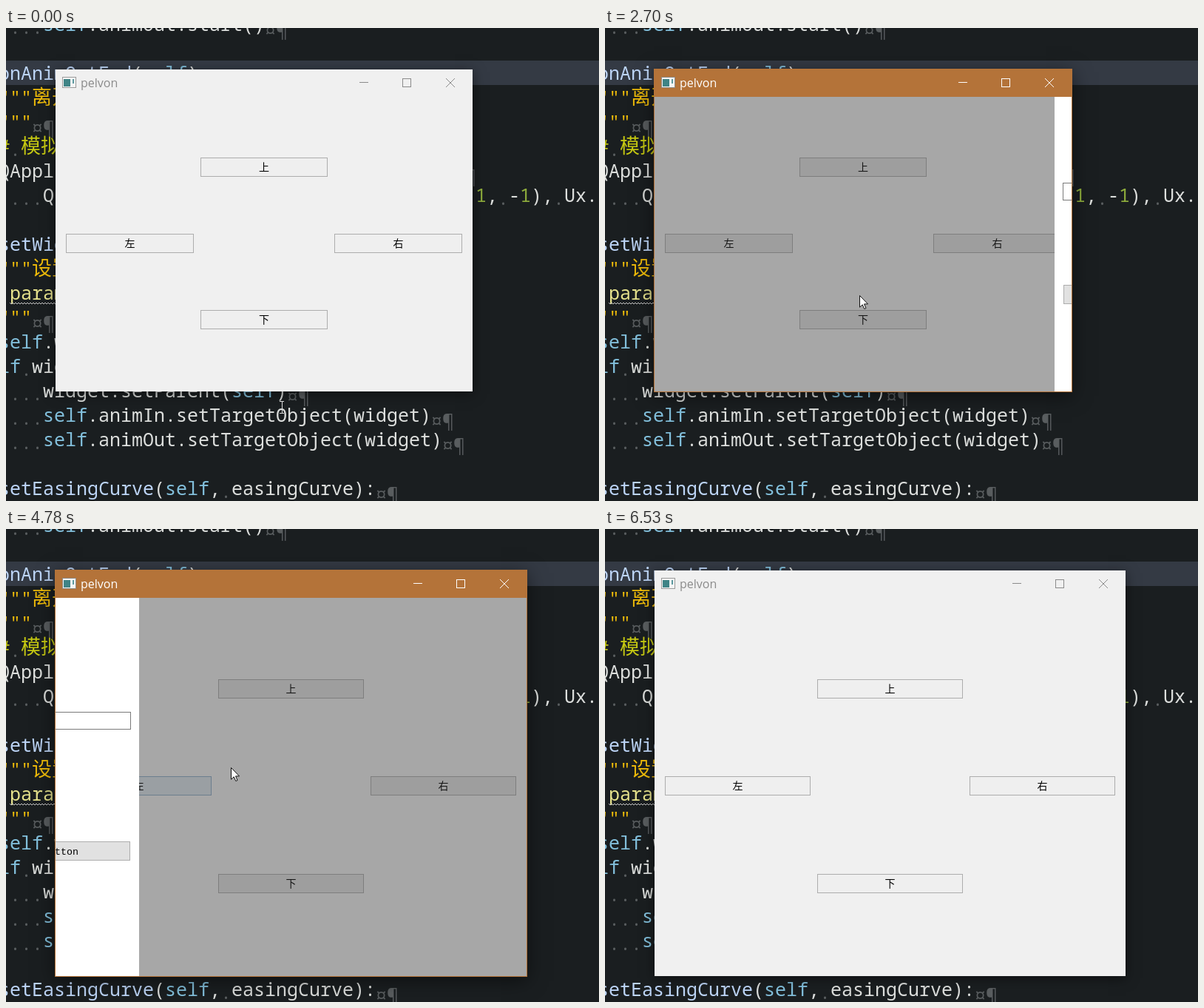
Write an HTML page with a canvas that moves like this. It is 802 px wide and 639 px high and loops after 6.56 s.

```html
<!DOCTYPE html>
<html lang="zh">
<head>
<meta charset="utf-8">
<style>
html, body { margin: 0; width: 100%; height: 100%; overflow: hidden; background: #1a1e20; }
canvas { display: block; }
</style>
</head>
<body>
<canvas id="stage" width="802" height="639"></canvas>
<script>
const g = document.getElementById('stage').getContext('2d');
const LOOP = 6560, SLIDE = 250, LEFT = 67, TOP = 93;
const GRAB = 4060, DROP = 4450, FOCUS = 250, BLUR = 6440;
const CELL = 15, ROW = 33;
const MONO = '25px "Noto Sans Mono", "Noto Sans CJK SC", monospace';
const HAN = '27px "Noto Sans CJK SC", "Noto Sans CJK", sans-serif';
const LABEL = '300 14px "Noto Sans CJK SC", "Noto Sans CJK", sans-serif';

const CODE = [
  '    self.animOut.start()¤¶',
  '',
  'onAnimOutEnd(self):',
  '"""离开',
  '"""¤¶',
  '# 模拟',
  'QAppl'.padEnd(41) + '¤¶',
  '    Q'.padEnd(43) + '1, -1), Ux.',
  '',
  'setWidget(',
  '"""设置',
  ':param',
  '"""¤¶',
  'self.widget',
  'if widget',
  '    widget.setParent(self)¤¶',
  '    self.animIn.setTargetObject(widget)¤¶',
  '    self.animOut.setTargetObject(widget)¤¶',
  '',
  'setEasingCurve(self, easingCurve):¤¶'
];

const INKS = [
  [/^[a-z]\w+(?=\()/, '#bcd4f6'],
  [/^"""[^¤]*/, '#eebb0a'],
  [/^#.*/, '#c6c912'],
  [/^(self|if)\b/, '#82bfdb'],
  [/^param/, '#e6e28c'],
  [/^\d/, '#8fae3c'],
  [/^[¤¶ ]/, '#595d5f'],
  [/^(\w+|.)/, '#dcdedc']
];

// when each drawer is opened and closed, and where the closing click lands
const VISITS = [
  { side: 'left', open: 300, close: 620, away: [400, 300] },
  { side: 'top', open: 890, close: 1582, away: [345, 293] },
  { side: 'right', open: 2030, close: 2575, away: [343, 360] },
  { side: 'bottom', open: 2840, close: 3178, away: [473, 353] },
  { side: 'left', open: 4725, close: 5180, away: [391, 301] },
  { side: 'top', open: 5740, close: 6130, away: [420, 588] }
];

const BUTTONS = {
  top: ['上', 1, -1], left: ['左', 0, 0], right: ['右', 2, 0], bottom: ['下', 1, 1]
};

const clamp = v => Math.max(0, Math.min(1, v));
const mix = (a, b, k) => a + (b - a) * k;
const easeOut = k => 1 - (1 - k) ** 3;
const smooth = k => k * k * (3 - 2 * k);
const blend = (a, b, k) => `rgb(${a.map((v, i) => Math.round(mix(v, b[i], k)))})`;

function rect(x, y, w, h, fill) {
  g.fillStyle = fill;
  g.fillRect(x, y, w, h);
}

function box(x, y, w, h, fill, line) {
  rect(x, y, w, h, line);
  rect(x + 1, y + 1, w - 2, h - 2, fill);
}

function text(str, x, y, font, fill, align = 'left') {
  g.font = font;
  g.fillStyle = fill;
  g.textAlign = align;
  g.fillText(str, x, y);
}

function lines(color, width, ...paths) {
  g.strokeStyle = color;
  g.lineWidth = width;
  g.beginPath();
  for (const p of paths)
    p.forEach(([x, y], i) => i ? g.lineTo(x, y) : g.moveTo(x, y));
  g.stroke();
}

function drawLine(line, y) {
  let x = -10, rest = line;
  while (rest) {
    const [pattern, ink] = INKS.find(([p]) => p.test(rest) && (p !== INKS[0][0] || rest === line));
    const token = rest.match(pattern)[0];
    for (const ch of token) {
      const wide = ch > '\u3000';
      if (ch === ' ') text('.', x, y + 4, MONO, '#595d5f');
      else text(ch, x, y + ('¤¶'.includes(ch) ? 8 : 0), wide ? HAN : MONO, ink);
      x += wide ? 27 : CELL;
    }
    rest = rest.slice(token.length);
  }
}

function drawCode() {
  rect(0, 0, 802, 639, '#1a1e20');
  rect(0, 44, 802, ROW, '#343a44');
  CODE.forEach((line, i) => drawLine(line, 4 + i * ROW));
  const wave = [];
  for (let x = 5; x < 70; x += 2) wave.push([x, 371 + (x >> 1) % 2 * 2]);
  lines('#c8c8c8', 1, wave);
}

function sizeAt(t) {
  const k = smooth(clamp((t - GRAB) / (DROP - GRAB)));
  return [Math.round(mix(564, 637, k)), Math.round(mix(398, 511, k))];
}

function buttonBox(side, w, h) {
  const [, col, row] = BUTTONS[side];
  const bw = (w - 46) / 3, x0 = LEFT + 14 + col * (bw + 9);
  const x = Math.round(x0);
  const y = Math.floor(TOP + h / 2 - 13.6 + row * (h / 4 + 3.4));
  return [x, y, Math.round(x0 + bw) - x, 26];
}

function drawFrame(w, h, active) {
  const right = LEFT + w;
  g.save();
  g.shadowColor = 'rgba(0,0,0,.5)';
  g.shadowBlur = active ? 24 : 16;
  g.shadowOffsetY = active ? 5 : 3;
  if (active) rect(66, 55, w + 2, h + 39, '#b47339');
  else rect(67, 56, w, h + 37, '#f0f0f0');
  g.restore();
  rect(LEFT, TOP, w, h, '#f0f0f0');

  const fg = active ? '#fff' : '#8b8b8b';
  box(76, 66, 19, 15, '#f4f4f4', active ? '#8f8a84' : '#9a9a9a');
  rect(78, 69, 9, 10, '#3f8486');
  rect(90, 69, 2, 6, '#5d9aa0');
  text('pelvon', 101, 80, '16px "Open Sans", "Noto Sans", sans-serif', fg);
  rect(right - 153, 73, 12, 1, fg);
  g.strokeStyle = fg;
  g.lineWidth = 1;
  g.strokeRect(right - 94.5, 68.5, 11, 11);
  const cx = right - 30;
  lines(fg, 1, [[cx - 6, 68], [cx + 6, 80]], [[cx + 6, 68], [cx - 6, 80]]);
}

function drawButtons(t, w, h, active) {
  const lit = VISITS.find(v => t > v.open - 60 && t < v.open + 200);
  for (const side in BUTTONS) {
    const [x, y, bw, bh] = buttonBox(side, w, h);
    const k = lit && lit.side === side ? clamp((t - lit.open + 60) / 100) : 0;
    const fill = active ? blend([225, 225, 225], [218, 226, 233], k) : '#efefef';
    box(x, y, bw, bh, fill, blend([173, 173, 173], [142, 173, 198], k * k));
    text(BUTTONS[side][0], x + bw / 2, y + 18, LABEL, '#000', 'center');
  }
}

function drawDrawer(side, shown, w, h) {
  const flat = side === 'top' || side === 'bottom';
  const pw = flat ? w : Math.round(w / 3), ph = flat ? Math.round(h / 2) : h;
  const reveal = Math.ceil((flat ? ph : pw) * shown);
  const x = LEFT + (side === 'left' ? reveal - pw : side === 'right' ? w - reveal : 0);
  const y = TOP + (side === 'top' ? reveal - ph : side === 'bottom' ? h - reveal : 0);
  const gap = (ph - 50) / 3, by = y + Math.round(ph - 28 - gap);
  rect(LEFT, TOP, w, h, 'rgba(55,55,55,.392)');
  rect(x, y, pw, ph, '#fff');
  box(x + 11, y + Math.round(gap), pw - 22, 24, '#fff', '#7a7a7a');
  box(x + 12, by, pw - 24, 26, '#e1e1e1', '#adadad');
  text('button', x + pw / 2, by + 18, '13.3px "Liberation Mono", monospace', '#000', 'center');
}

// the pointer rests on each button, then at each closing spot
function buildPath() {
  const stops = [{ from: 0, to: 30, at: [373, 512] }];
  for (const { side, open, close, away } of VISITS) {
    const [x, y, w] = buttonBox(side, ...sizeAt(open));
    stops.push({ from: open - 50, to: open + 10, at: [x + w / 2 + 12, y + 15] });
    stops.push({ from: open + 200, to: close + 125, at: away });
  }
  stops.push({ from: 3870, to: DROP, at: null });
  stops.push({ from: 6400, to: LOOP, at: [440, 650] });
  return stops.sort((a, b) => a.from - b.from);
}

const STOPS = buildPath();

function pointerAt(t) {
  const corner = () => {
    const [w, h] = sizeAt(t);
    return [LEFT + w - 1, TOP + h - 1];
  };
  const i = STOPS.findIndex(s => t < s.to), next = STOPS[i];
  const end = next.at || corner();
  if (t >= next.from) return end;
  const last = STOPS[i - 1], start = last.at || corner();
  const k = easeOut((t - last.to) / (next.from - last.to));
  return [mix(start[0], end[0], k), mix(start[1], end[1], k)];
}

function drawPointer(t, x, y) {
  g.save();
  g.translate(Math.round(x), Math.round(y));
  if (t < FOCUS && y > 491) {
    lines('#d8d8d8', 1, [[-3, -7.5], [3, -7.5]], [[.5, -7], [.5, 8]], [[-3, 8.5], [3, 8.5]]);
  } else if (t > 3800 && t < DROP) {
    const arrow = [[-6, 0], [-6, -6], [0, -6]], tail = [[6, 0], [6, 6], [0, 6]], bar = [[-6, -6], [6, 6]];
    lines('#000', 4, arrow, tail, bar);
    lines('#fff', 2, arrow, tail, bar);
  } else {
    const p = new Path2D('M.5 .5V16.2L4.2 12.8L6.8 18.5L9 17.5L6.5 11.9H11.5Z');
    g.fillStyle = '#fff';
    g.fill(p);
    g.strokeStyle = '#111';
    g.lineWidth = 1;
    g.stroke(p);
  }
  g.restore();
}

function draw(t) {
  const [w, h] = sizeAt(t), [px, py] = pointerAt(t);
  const active = t >= FOCUS && t < BLUR;

  drawCode();
  drawFrame(w, h, active);
  g.save();
  g.beginPath();
  g.rect(LEFT, TOP, w, h);
  g.clip();
  drawButtons(t, w, h, active);
  const visit = VISITS.find(v => t >= v.open && t < v.close + SLIDE);
  if (visit) {
    const opening = t < visit.close;
    const k = easeOut(clamp((t - (opening ? visit.open : visit.close)) / SLIDE));
    drawDrawer(visit.side, opening ? k : 1 - k, w, h);
  }
  g.restore();

  if (VISITS.some(v => [v.open, v.close].some(at => t >= at - 50 && t < at))) {
    g.fillStyle = 'rgba(130,240,85,.8)';
    g.beginPath();
    g.arc(px, py, 12, 0, 2 * Math.PI);
    g.fill();
  }
  drawPointer(t, px, py);
}

const born = performance.now();
function tick() {
  draw((performance.now() - born) % LOOP);
  requestAnimationFrame(tick);
}
tick();
</script>
</body>
</html>
```
